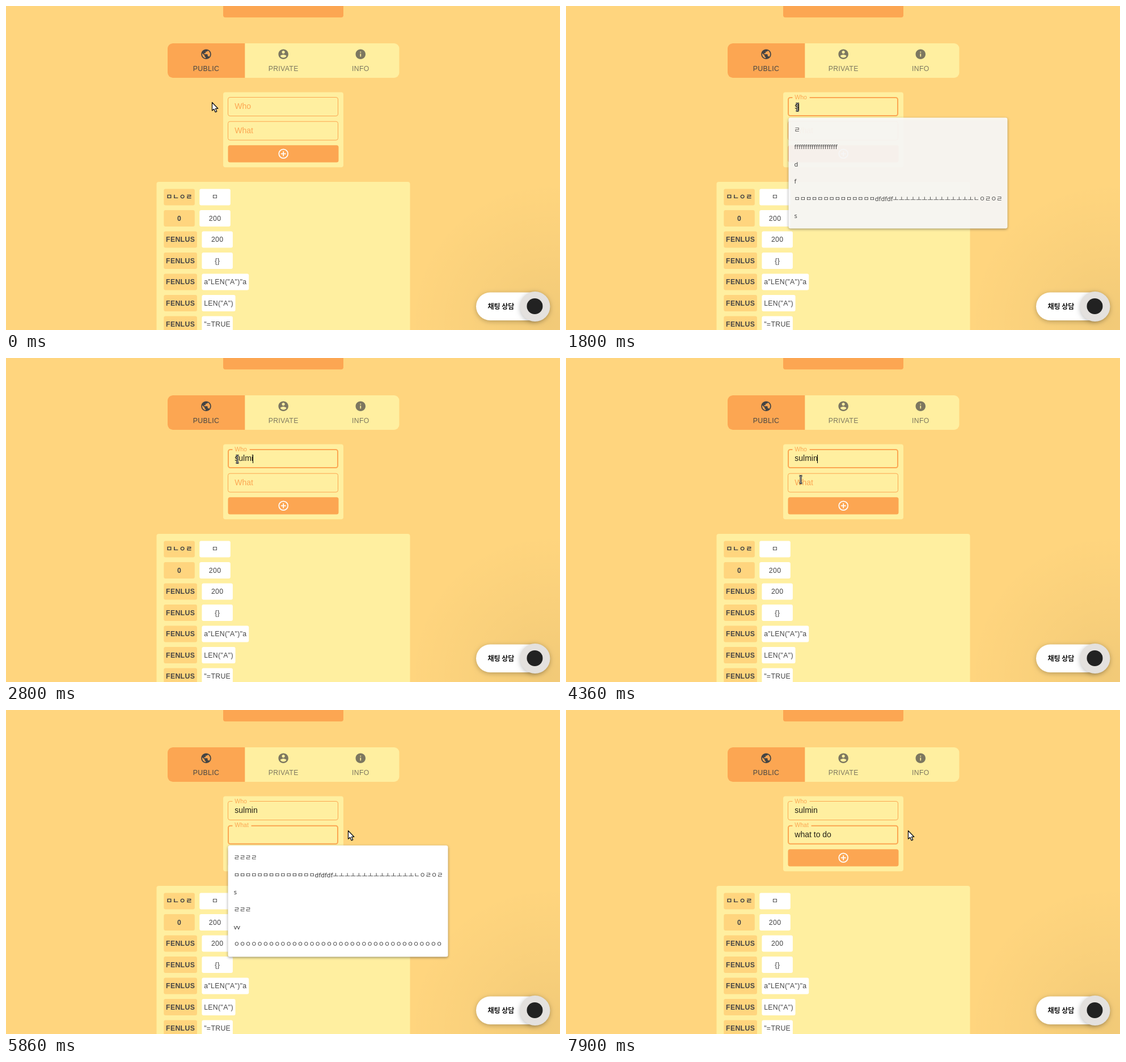
An HTML page with a canvas for the animation above (8000 ms loop, 977 by 573 pixels).

```html
<!DOCTYPE html>
<html lang="ko">
<head>
<meta charset="utf-8">
<title>Form typing</title>
<style>
html, body { margin: 0; width: 100%; height: 100%; overflow: hidden; background: #ffd57e; }
canvas { display: block; }
</style>
</head>
<body>
<canvas id="stage" width="977" height="573"></canvas>
<script>
const ctx = document.getElementById('stage').getContext('2d');
const LOOP = 8000;
const SAND = '#ffd57e', PALE = '#ffefa0', ORANGE = '#fca652', INK = '#444';
const SANS = '"Liberation Sans", "Noto Sans CJK KR", "Noto Sans CJK", sans-serif';
const LIST = '"Noto Sans", "Noto Sans CJK KR", "Noto Sans CJK", sans-serif';

const DISC = 'M12 2C6.48 2 2 6.48 2 12s4.48 10 10 10 10-4.48 10-10S17.52 2 12 2z';
const ICONS = {
  globe: DISC + 'm-1 17.93c-3.95-.49-7-3.85-7-7.93 0-.62.08-1.21.21-1.79L9 15v1c0 1.1.9 2 2 2v1.93zm6.9-2.54c-.26-.81-1-1.39-1.9-1.39h-1v-3c0-.55-.45-1-1-1H8v-2h2c.55 0 1-.45 1-1V7h2c1.1 0 2-.9 2-2v-.41c2.93 1.19 5 4.06 5 7.41 0 2.08-.8 3.97-2.1 5.39z',
  person: DISC + 'm0 3c1.66 0 3 1.34 3 3s-1.34 3-3 3-3-1.34-3-3 1.34-3 3-3zm0 14.2c-2.5 0-4.71-1.28-6-3.22.03-1.99 4-3.08 6-3.08 1.99 0 5.97 1.09 6 3.08-1.29 1.94-3.5 3.22-6 3.22z',
  info: DISC + 'm1 15h-2v-6h2v6zm0-8h-2V7h2v2z'
};
for (const k in ICONS) ICONS[k] = new Path2D(ICONS[k]);
const ARROW = new Path2D('M0 0V14.6L3.3 11.7L5.7 17.2L8.2 16.1L5.9 10.8H10.3Z');
const BEAM = new Path2D('M-2.5-6.5H-1L0-5.5L1-6.5H2.5M0-5.5V5.5M-2.5 6.5H-1L0 5.5L1 6.5H2.5');

const NAME = 'sulmin', NOTE = 'what to do', HANDLE = 'FENLUS';
const ROWS = [
  ['ㅁㄴㅇㄹ', 'ㅁ'], ['0', '200'], [HANDLE, '200'], [HANDLE, '{}'],
  [HANDLE, 'a"LEN("A")"a'], [HANDLE, 'LEN("A")'], [HANDLE, '"=TRUE']
];
const LONG = 'ㅁ'.repeat(14) + 'dfdfdf' + 'ㅗ'.repeat(14) + 'ㄴㅇㄹㅇㄹ';
const MENUS = {
  who: { y: 197, items: ['ㄹ', 'f'.repeat(20), 'd', 'f', LONG, 's'] },
  what: { y: 239.5, items: ['ㄹㄹㄹㄹ', LONG, 's', 'ㄹㄹㄹ', 'vv', 'ㅇ'.repeat(36)] }
};

// Each step patches the state left by the one before it.
const START = { x: 363.5, y: 170.5, arrow: true, who: 0, what: 0, lift: 0, lift2: 0,
  focus: '', caret: false, menu: '', alpha: 1, scale: 1 };
const STEPS = [
  [500, { x: 374, y: 172 }],
  [660, { x: 397, y: 177, arrow: false }],
  [800, { x: 408, y: 179 }],
  [930, { focus: 'who', caret: true, menu: 'who', lift: 0.5 }],
  [1130, { lift: 0.97 }],
  [1260, { lift: 1 }],
  [1530, { caret: false }],
  [1800, { who: 1, caret: true, alpha: 0.9, scale: 0.995 }],
  [2000, { alpha: 0.25, scale: 0.963 }],
  [2160, { who: 2, menu: '', alpha: 1, scale: 1 }],
  [2460, { who: 3 }],
  [2630, { who: 4 }],
  [2800, { who: 5 }],
  [3100, { who: 6 }],
  [3730, { caret: false }],
  [4030, { caret: true }],
  [4200, { x: 411, y: 197 }],
  [4360, { x: 414, y: 215 }],
  [4730, { focus: 'what', menu: 'what', lift2: 1 }],
  [5000, { x: 448, y: 208 }],
  [5130, { x: 512, y: 206 }],
  [5260, { x: 574, y: 210, caret: false }],
  [5430, { x: 603.5, y: 213.5, arrow: true, caret: true }],
  [5860, { caret: false }],
  [6160, { what: 3, menu: '', caret: true }],
  [6330, { what: 5 }],
  [6630, { what: 7 }],
  [6930, { what: 8 }],
  [7260, { what: 9 }],
  [7430, { what: 10 }],
  [7900, { caret: false }]
];

function stateAt(t) {
  const s = { ...START };
  for (const [at, patch] of STEPS) if (t >= at) Object.assign(s, patch);
  return s;
}

function box(x, y, w, h, r, fill) {
  ctx.beginPath();
  ctx.roundRect(x, y, w, h, r);
  ctx.fillStyle = fill;
  ctx.fill();
}

function shadow(color, blur, dy) {
  ctx.shadowColor = color;
  ctx.shadowBlur = blur;
  ctx.shadowOffsetY = dy;
}

function text(str, x, y, font, color, align = 'left', spacing = 0) {
  ctx.font = font;
  ctx.letterSpacing = spacing + 'px';
  ctx.textAlign = align;
  ctx.fillStyle = color;
  ctx.fillText(str, x, y);
}

function icon(path, cx, cy, color) {
  ctx.save();
  ctx.translate(cx - 10.5, cy - 10.5);
  ctx.scale(0.875, 0.875);
  ctx.fillStyle = color;
  ctx.fill(path);
  ctx.restore();
}

function drawTabs() {
  box(383, -20, 212, 40.3, 4, ORANGE);
  box(285, 66, 408.5, 61, 9, PALE);
  box(285, 66, 136.3, 61, [9, 0, 0, 9], ORANGE);
  [['globe', 'PUBLIC'], ['person', 'PRIVATE'], ['info', 'INFO']].forEach(([name, label], i) => {
    const cx = 353 + 136.15 * i;
    ctx.globalAlpha = i ? 0.7 : 1;
    icon(ICONS[name], cx, 85.2, INK);
    text(label, cx, 115.2, '12.25px ' + SANS, INK, 'center', 0.35);
  });
  ctx.globalAlpha = 1;
}

function drawField(y, label, value, lift, focused, caret) {
  const line = focused ? 2 : 1;
  ctx.beginPath();
  ctx.roundRect(391.5 + (line - 1) / 2, y + line / 2, 195 - line, 34 - line, 3.5);
  ctx.strokeStyle = ORANGE;
  ctx.lineWidth = line;
  ctx.stroke();

  const size = 14 - 3.5 * lift;
  const font = size + 'px ' + SANS;
  if (lift > 0.9) {
    ctx.font = font;
    ctx.letterSpacing = '0px';
    ctx.fillStyle = PALE;
    ctx.fillRect(399.5, y - 1, ctx.measureText(label).width + 8.5, 4);
  }
  text(label, 403.3, y + 21.3 - 17.6 * lift, font, ORANGE);

  text(value, 403.3, y + 21.3, '14px ' + SANS, 'rgba(0,0,0,.87)');
  if (focused && caret) {
    const x = Math.floor(403.3 + ctx.measureText(value).width);
    ctx.fillStyle = '#000';
    ctx.fillRect(x, Math.round(y + 10), 1, 15);
  }
}

function drawForm(s) {
  box(383, 152.5, 212, 132.7, 4, PALE);
  drawField(161, 'Who', NAME.slice(0, s.who), s.lift, s.focus === 'who', s.caret);
  drawField(203.7, 'What', NOTE.slice(0, s.what), s.lift2, s.focus === 'what', s.caret);
  box(391.5, 246.3, 195, 30.3, 3.5, ORANGE);
  ctx.strokeStyle = '#fff';
  ctx.lineWidth = 1.75;
  ctx.beginPath();
  ctx.arc(489.2, 261.3, 7.9, 0, 7);
  ctx.moveTo(484.8, 261.3);
  ctx.lineTo(493.6, 261.3);
  ctx.moveTo(489.2, 256.9);
  ctx.lineTo(489.2, 265.7);
  ctx.stroke();
}

function chip(str, x, cy, weight, fill) {
  const font = weight + ' 12.25px ' + SANS;
  ctx.font = font;
  ctx.letterSpacing = '0.35px';
  const w = Math.max(54.5, ctx.measureText(str).width + 7.5);
  box(x, cy - 14.5, w, 29, 3, fill);
  text(str, x + w / 2, cy + 4.4, font, INK, 'center', 0.35);
  return x + w + 8.5;
}

function drawRows() {
  box(265.5, 311, 447, 280, 4, PALE);
  ROWS.forEach(([who, what], i) => {
    const cy = 338 + 37.5 * i;
    chip(what, chip(who, 278.3, cy, 'bold', SAND), cy, 'normal', '#fff');
  });
}

function drawMenu(s) {
  if (!s.menu) return;
  const { y, items } = MENUS[s.menu];
  ctx.save();
  ctx.globalAlpha = s.alpha;
  ctx.translate(585.5, y + 98.5);
  ctx.scale(s.scale, s.scale);
  ctx.translate(-585.5, -y - 98.5);
  shadow('rgba(0,0,0,.4)', 4, 1.5);
  box(391.5, y, 388, 197, 3.5, '#fff');
  shadow('transparent', 0, 0);
  items.forEach((item, i) => text(item, 401.7, y + 25.3 + 30.7 * i, '11.1px ' + LIST, '#333'));
  ctx.restore();
}

function drawChat() {
  shadow('rgba(0,0,0,.25)', 8, 2);
  box(829, 506.5, 125, 49.5, 24.75, '#fff');
  box(906.5, 505, 53, 53, 26.5, '#e4e1de');
  shadow('transparent', 0, 0);
  text('채팅 상담', 849.5, 536.3, 'bold 12px "Noto Sans CJK KR", "Noto Sans CJK", sans-serif', '#111');
  box(918.5, 517, 28, 28, 14, '#222');
}

function drawPointer(s) {
  ctx.save();
  ctx.translate(s.x, s.y);
  ctx.lineJoin = 'round';
  if (s.arrow) {
    ctx.fillStyle = '#fff';
    ctx.fill(ARROW);
    ctx.strokeStyle = '#111';
    ctx.lineWidth = 1.3;
    ctx.stroke(ARROW);
  } else {
    ctx.strokeStyle = '#111';
    ctx.lineWidth = 3;
    ctx.stroke(BEAM);
    ctx.strokeStyle = '#fff';
    ctx.lineWidth = 0.9;
    ctx.stroke(BEAM);
  }
  ctx.restore();
}

function drawBackdrop() {
  ctx.fillStyle = SAND;
  ctx.fillRect(0, 0, 977, 573);
  const glow = ctx.createRadialGradient(960, 560, 0, 960, 560, 250);
  glow.addColorStop(0, 'rgba(0,0,0,.055)');
  glow.addColorStop(0.5, 'rgba(0,0,0,.025)');
  glow.addColorStop(1, 'rgba(0,0,0,0)');
  ctx.fillStyle = glow;
  ctx.fillRect(700, 300, 277, 273);
}

function frame(now) {
  const s = stateAt(now % LOOP);
  drawBackdrop();
  drawTabs();
  drawForm(s);
  drawRows();
  drawMenu(s);
  drawChat();
  drawPointer(s);
}

const begin = performance.now();
function tick() {
  frame(performance.now() - begin);
  requestAnimationFrame(tick);
}
tick();
</script>
</body>
</html>
```
